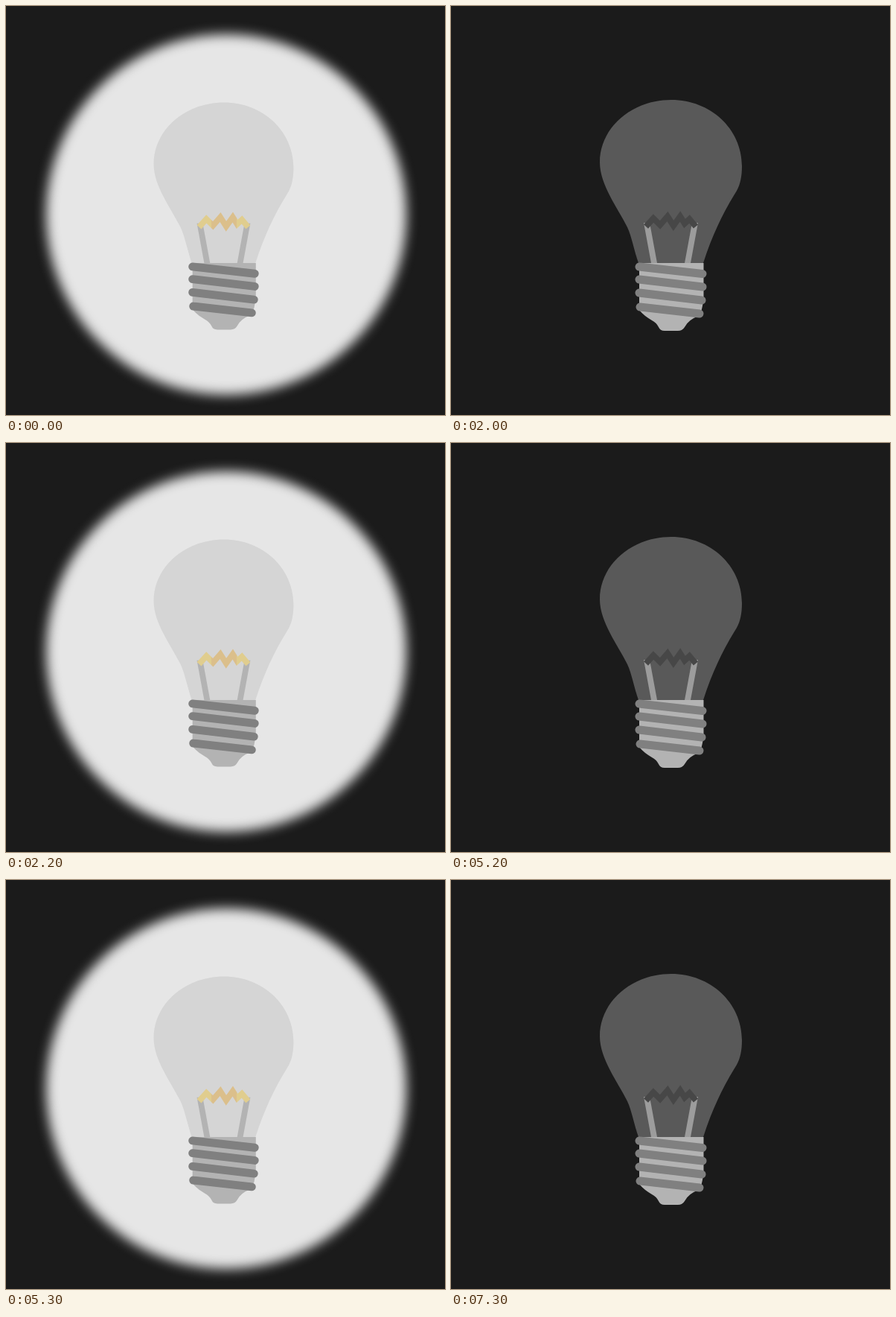
These frames come from a looping animation (590 by 549 pixels, 7.4 s). An HTML page without scripts:

```html
<!DOCTYPE html>
<html lang="en">
<head>
<meta charset="utf-8">
<title>Flickering bulb</title>
<style>
  html, body { margin: 0; width: 100%; height: 100%; overflow: hidden; background: #1b1b1b; }
  svg { display: block; width: 590px; height: 549px; }

  .off { --glass: #595959; --wire: #9c9c9c; --filament: #474747; }
  .on  { --glass: #d5d5d5; --wire: #b3b3b3; --filament: url(#hot); animation: flicker 7.4s step-end infinite; }

  .glass { fill: var(--glass); }
  .wires { fill: var(--wire); }
  .filament { fill: none; stroke: var(--filament); stroke-width: 8; }
  .cap { fill: #b3b3b3; }
  .thread { stroke: #808080; stroke-width: 11; stroke-linecap: round; }

  /* off at 2.0-2.2 s, 5.2-5.3 s and 7.3-7.4 s */
  @keyframes flicker {
    0%, 29.7297%, 71.6216% { visibility: visible; }
    27.027%, 70.2703%, 98.6486%, 100% { visibility: hidden; }
  }
</style>
</head>
<body>
<svg viewBox="0 0 590 549">
  <defs>
    <filter id="soft" x="-20%" y="-20%" width="140%" height="140%" color-interpolation-filters="sRGB">
      <feGaussianBlur stdDeviation="8"/>
    </filter>
    <linearGradient id="hot" gradientUnits="userSpaceOnUse" x1="258" x2="332" y1="0" y2="0">
      <stop offset=".28" stop-color="#e0cd8e"/>
      <stop offset=".28" stop-color="#dbbf8b"/>
      <stop offset=".75" stop-color="#dbbf8b"/>
      <stop offset=".75" stop-color="#e0cd8e"/>
    </linearGradient>
    <g id="bulb">
      <path class="glass" d="M252 345C246 328 243 310 237 297C224 271 200 240 200 210C200 163 243 126 296 126C349 126 391 165 391 215C391 228 389 239 384 248C366 277 352 305 339 345Z"/>
      <path class="wires" d="M259 291h8l10 54h-8zM324 291h8l-10 54h-8z"/>
      <path class="filament" d="M262 296L272 285L281 294L291 282.5L299 295L308 282.5L314 292L320.5 286L329 296"/>
      <path class="cap" d="M253 345H339.500V390Q338 410 333 416Q319 421 314 431Q311 436 305 436H287Q281 436 279 431Q276 425 270 422Q258 415 253 408Z"/>
      <path class="thread" d="M253 350L338 359.500M253 367L338 377M253 385L337 395M254 404L334 413"/>
    </g>
  </defs>

  <use class="off" href="#bulb"/>
  <g class="on">
    <circle cx="296" cy="280" r="242" fill="#e6e6e6" filter="url(#soft)"/>
    <use href="#bulb" transform="translate(1.7 5.5) scale(.984)"/>
  </g>
</svg>
</body>
</html>
```
